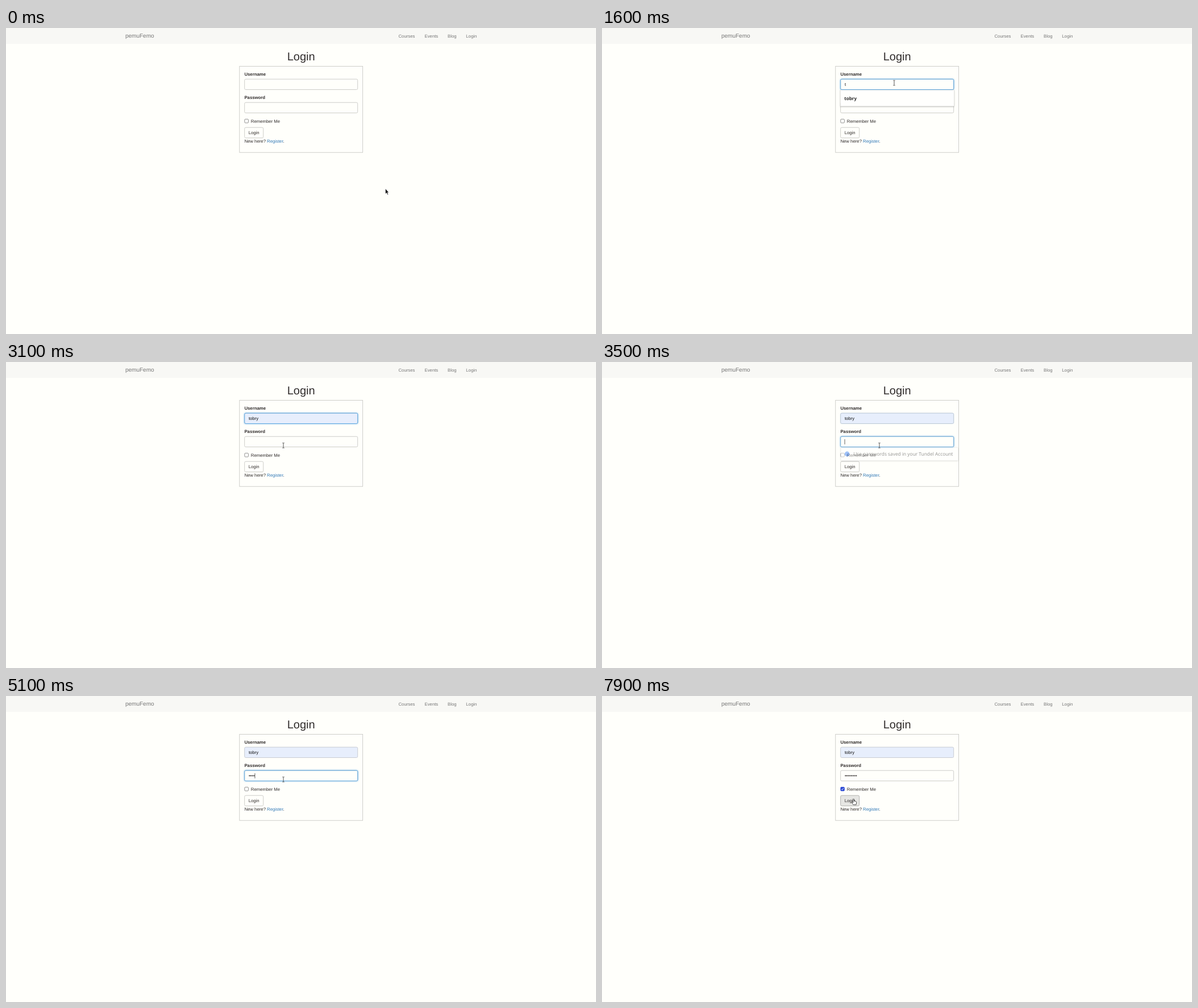
An HTML page that plays this animation: 1038x539 px, repeating every 8000 ms.

```html
<!DOCTYPE html>
<html lang="en">
<head>
<meta charset="utf-8">
<title>Login</title>
<style>
  html, body { margin: 0; width: 100%; height: 100%; overflow: hidden; background: #fffffb; }
  svg { display: block; width: 100%; height: 100%; }
  text { font: 7.78px "Liberation Sans", Arial, sans-serif; fill: #302c2c; text-rendering: geometricPrecision; white-space: pre; }
  .nav text { fill: #777; }
  .nav .brand { font-size: 10px; }
  .title { font-size: 20px; }
  .bold { font-weight: 700; }
  .link { fill: #337ab7; }
  .popup text { font: 8.4px "Open Sans", "Noto Sans", sans-serif; fill: #2c2c2c; }
  .popup .entry { font-size: 8.1px; font-weight: 700; }
  .line { fill: #fffffb; stroke: #c8c8c5; stroke-width: .9; }
  .sheet { fill: #fffffd; stroke: #d8d8d5; stroke-width: .4; }
  .glow { fill: #66afe9; filter: url(#blur); }
  .ring { fill: none; stroke: #5aa7e2; stroke-width: .95; }
  .caret { fill: #222; }
</style>
</head>
<body>
<svg viewBox="0 0 1038 539">
  <defs>
    <filter id="blur" x="-5%" y="-50%" width="110%" height="200%"><feGaussianBlur stdDeviation="1.5"/></filter>
    <filter id="shade" x="-5%" y="-30%" width="110%" height="170%"><feDropShadow dx="0" dy=".8" stdDeviation=".9" flood-opacity=".32"/></filter>
  </defs>

  <rect width="1038" height="539" fill="#fffffb"/>
  <g class="nav">
    <rect width="1038" height="27.8" fill="#f8f8f5"/>
    <text class="brand" x="210" y="17.4">pemuFemo</text>
    <text x="690.5" y="16.8">Courses</text>
    <text x="736.5" y="16.8">Events</text>
    <text x="777" y="16.8">Blog</text>
    <text x="809.3" y="16.8">Login</text>
  </g>

  <text class="title" x="519.2" y="56.8" text-anchor="middle">Login</text>
  <rect class="line" x="410.8" y="67.4" width="216.8" height="151.8"/>

  <text class="bold" x="419.4" y="84">Username</text>
  <g id="user">
    <rect class="glow" x="419" y="89.7" width="200.4" height="19.2" rx="2.5"/>
    <rect class="line" x="419.7" y="90.1" width="199" height="18.4" rx="2.2"/>
    <rect class="ring" x="419.7" y="90.1" width="199" height="18.4" rx="2.2"/>
  </g>
  <text id="name" x="426.9" y="102" style="fill:#111"></text>
  <rect id="nameCaret" class="caret" x="444.4" y="94.5" width=".7" height="9.2"/>

  <text class="bold" x="419.4" y="125.2">Password</text>
  <g id="pass">
    <rect class="glow" x="419" y="130.8" width="200.4" height="19.2" rx="2.5"/>
    <rect class="line" x="419.7" y="131.2" width="199" height="18.4" rx="2.2"/>
    <rect class="ring" x="419.7" y="131.2" width="199" height="18.4" rx="2.2"/>
  </g>
  <text id="dots" x="426.9" y="143.1"></text>
  <rect id="passCaret" class="caret" y="136.1" width=".7" height="9"/>

  <rect id="check" x="419.9" y="160.6" width="6.5" height="6.5" rx="1.2" stroke-width=".8"/>
  <path id="tick" d="M421.3 164L422.6 165.3L425.1 162.2" fill="none" stroke="#fff"/>
  <text x="430.8" y="166.6">Remember Me</text>

  <rect id="button" x="419.7" y="175.2" width="33" height="18.4" rx="2.2" stroke-width=".9"/>
  <text x="426.7" y="187.2">Login</text>
  <text x="419.4" y="202.1">New here? <tspan class="link">Register</tspan>.</text>

  <g id="names" class="popup">
    <rect id="namesSheet" class="sheet" x="419.6" y="109.2" width="199.6" filter="url(#shade)"/>
    <rect id="row" x="419.8" y="113.8" width="199.2" height="19.4" fill="#e4e4e2"/>
    <text class="entry" x="426.2" y="126.8">tobry</text>
  </g>
  <g id="saved" class="popup">
    <rect class="sheet" x="420.2" y="150.8" width="206.4" height="22.4" filter="url(#shade)"/>
    <circle cx="431.2" cy="162" r="4.4" fill="#4285f4"/>
    <text x="442.2" y="165">Use passwords saved in your Tundel Account</text>
  </g>

  <g id="cursor" stroke-linejoin="round">
    <path id="arrow" d="M0 0V9.2L2.1 7.3L3.6 10.7L5 10.1L3.5 6.8H6Z" fill="#111" stroke="#fff" stroke-width=".5"/>
    <path id="beam" d="M-1.7-4.4H-.5L0-4L.5-4.4H1.7M0-4V4M-1.7 4.4H-.5L0 4L.5 4.4H1.7" fill="none" stroke="#444" stroke-width=".9"/>
    <path id="hand" d="M-.9 .9Q-.9 0 0 0T.9 .9V3.7L3.7 4.2Q5.2 4.5 5 6.2L4.3 10.2H-.5L-3 6.7Q-3.2 5.4-1.9 5.7L-.9 6.5Z" fill="#fff" stroke="#222" stroke-width=".8"/>
  </g>
</svg>
<script>
const LOOP = 8000, TICK = 100, DOT = 2.72;
const $ = id => document.getElementById(id);
const shapes = ['arrow', 'beam', 'hand'];
const [ARROW, BEAM, HAND] = [0, 1, 2];

// Each track lists [start time, value...]; a value holds until the next row.
const pointer = [
  [0, 667.5, 283, ARROW], [500, 652, 263, ARROW], [600, 592, 190, ARROW], [700, 533, 124, ARROW],
  [800, 515.5, 107, BEAM], [1000, 515, 101, BEAM], [1100, 514, 96.7, BEAM],
  [1800, 510, 101, BEAM], [1900, 504, 106, BEAM], [2000, 499.7, 111, ARROW],
  [2100, 497, 115, ARROW], [2200, 495, 118, ARROW],
  [2600, 494, 122, ARROW], [2700, 491, 134, BEAM], [2800, 489, 142, BEAM], [2900, 488, 147, BEAM],
  [6700, 474, 151, ARROW], [6800, 452, 155, ARROW], [6900, 432, 158, ARROW], [7000, 423, 159.5, HAND],
  [7600, 428, 165, HAND], [7700, 434, 171, ARROW], [7800, 440, 178, HAND], [7900, 442.7, 181.4, HAND]
];
const userFocus = [[0, 0], [1400, .6], [1500, 1], [3400, .6], [3500, .1], [3600, 0]];
const passFocus = [[0, 0], [3400, .4], [3500, .9], [3600, 1], [7400, .5], [7500, 0]];
const nameText = [[0, ''], [1600, 't'], [2000, 'tobry']];
const listHeight = [[0, 0], [1500, 123], [1600, 28.4], [2500, 0]];
const savedFade = [[0, 0], [3500, .5], [3600, .9], [3700, 1], [4200, .66], [4300, .33], [4400, 0]];
const dotCount = [[0, 0], [4100, 1], [4500, 2], [4800, 3], [5100, 4], [5400, 5], [5700, 6], [6000, 7], [6400, 8]];

const at = (track, t) => track.findLast(row => row[0] <= t).slice(1);
const within = (t, from, to) => t >= from && t < to;
const show = (id, on) => { $(id).style.opacity = +on; };

function setFocus(id, level) {
  const [glow, , ring] = $(id).children;
  glow.style.opacity = level * .75;
  ring.style.opacity = level;
}

function paint(el, fill, stroke) {
  el.style.fill = fill;
  el.style.stroke = stroke;
}

function render(t) {
  const [x, y, shape] = at(pointer, t);
  $('cursor').setAttribute('transform', `translate(${x} ${y})`);
  shapes.forEach((id, i) => show(id, i === shape));

  setFocus('user', at(userFocus, t)[0]);
  setFocus('pass', at(passFocus, t)[0]);

  const filled = t >= 2000;
  paint($('user').children[1], filled ? '#e7eefc' : '#fffffb', filled ? '#c3c7d0' : '#c8c8c5');
  const name = $('name');
  name.textContent = at(nameText, t)[0];
  name.style.fontSize = within(t, 2000, 2500) ? '7.4px' : '7.78px';
  show('nameCaret', within(t, 2500, 3100));

  const [height] = at(listHeight, t);
  show('names', height > 0);
  $('namesSheet').setAttribute('height', height);
  show('row', filled);
  show('saved', at(savedFade, t)[0]);

  const [count] = at(dotCount, t);
  $('dots').textContent = '•'.repeat(count);
  $('passCaret').setAttribute('x', 426.7 + count * DOT);
  show('passCaret', within(t, 3400, 6900));

  const checked = t >= 7400, hover = t >= 7800;
  paint($('check'), checked ? '#2846d4' : '#fffffd', checked ? '#2846d4' : '#767676');
  show('tick', checked);
  paint($('button'), hover ? '#e6e6e3' : '#fffffb', hover ? '#adadab' : '#c8c8c5');
}

const start = performance.now();
function frame() {
  const t = (performance.now() - start) % LOOP;
  render(Math.floor(t / TICK) * TICK);
  requestAnimationFrame(frame);
}
frame();
</script>
</body>
</html>
```
